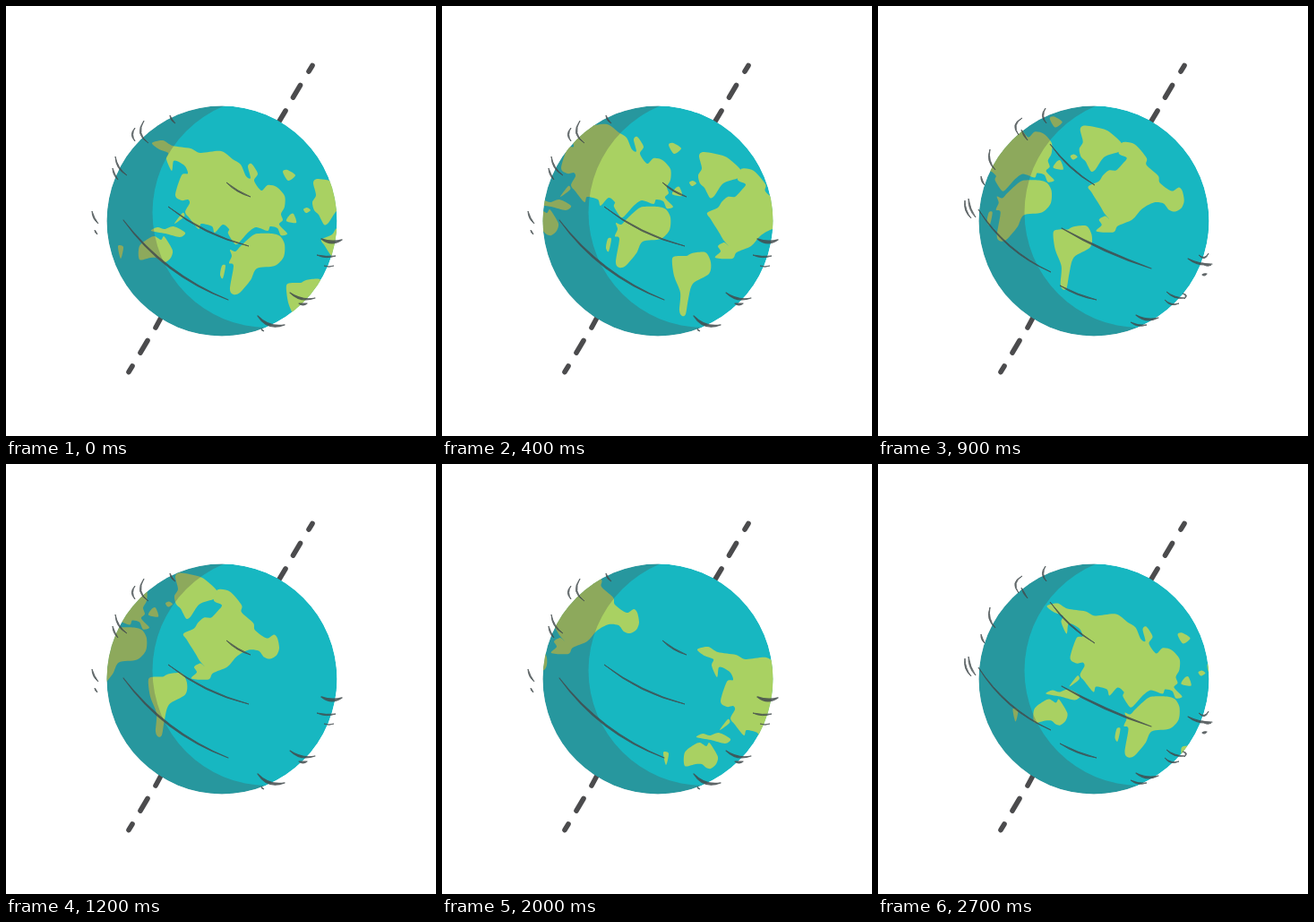
Write an HTML page that moves like this. It is 480x480 px and loops after 2800 ms.

```html
<!DOCTYPE html>
<html lang="en">
<head>
<meta charset="utf-8">
<title>Spinning globe</title>
<style>
html, body { margin: 0; width: 100%; height: 100%; overflow: hidden; background: #fff; }
svg { display: block; width: 100vw; height: 100vh; }
.lines { fill: #434b4d; stroke: #434b4d; stroke-linejoin: round; opacity: .85; }
</style>
</head>
<body>
<svg viewBox="0 0 480 480">
  <defs>
    <clipPath id="disc"><circle id="ball" cx="241" cy="240" r="128.5"/></clipPath>
    <clipPath id="rim"><use href="#ball"/></clipPath>
    <g id="land" fill="#a9d162"></g>
  </defs>
  <path d="M342 66.5L338 73M328.5 88.5L320.5 102M312 117L303 132M174 346L167 359M158 373.5L150 387M141 402L137 408.5"
    stroke="#4b4b4d" stroke-width="5.6" stroke-linecap="round"/>
  <g clip-path="url(#disc)">
    <use href="#ball" fill="#17b7c1"/>
    <g id="map">
      <use href="#land"/>
      <use href="#land" x="361" y="154"/>
    </g>
    <path d="M100 100H420V380H100ZM163.500 230.500a128.500 128.500 0 0 0 257 0a128.500 128.500 0 0 0-257 0Z"
      fill="#4d4d4d" fill-opacity=".3" fill-rule="evenodd"/>
  </g>
  <g class="lines"></g>
  <g class="lines"></g>
</svg>
<script>
const LOOP = 2800, STEP = 100;

const eurasia = `163,153 175,150 186,156 206,159 217,164 240,162 253,171 262,177 268,190 273,192
  270,179 274,176 281,187 277,195 285,206 292,200 302,202 311,212 311,224 307,232 309,239 305,244
  314,254 307,256 303,248 295,246 292,251 279,247 269,254 262,262 256,266 248,254 249,249 242,244
  233,253 230,246 218,243 215,249 205,237 200,230 205,220 203,216 196,217 189,211 196,189 203,187
  200,179 193,174 187,173 185,184 179,171 181,164 171,160`;

const africa = `250,272 256,274 262,268 274,257 281,254 297,254 306,257 311,266 310,280 300,290
  280,293 273,306 261,320 254,322 250,316 254,290 249,287 252,279`;

const australia = `149,268 160,259 166,257 173,261 176,257 180,262 186,273 184,281 178,286 173,285
  168,281 161,281 149,283`;

const greenland = `343,197 349,193 372,198 387,210 391,217 387,222 370,228 360,242 355,244 349,233
  344,228 342,219 346,211`;

const northAmerica = `352,261 364,255 368,249 375,243 383,243 390,236 395,229 386,224 390,212
  404,214 417,229 417,237 430,249 432,257 445,266 453,262 457,266 459,277 456,285 449,289 442,287
  436,280 425,279 412,286 401,298 385,305 380,312 361,311 367,304 364,298 371,294 376,298 370,291
  366,284 356,268`;

const southAmerica = `313,312 320,309 329,309 335,306 350,305 356,316 354,329 336,340 331,357
  328,374 324,376 321,370 322,350 315,331`;

const islands = `125,268 131,269 128,282/162,251 169,247 177,249 187,246 200,253 194,258 178,254/
  188,243 197,231 199,235/241,290 245,290 242,304 239,300/309,185 314,183 323,189 315,195/
  313,240 317,233 321,232 324,242/332,227 336,225 340,228 335,231`;

// Each stroke: start, end, bend and, if not the usual, thickness
const even = `246 197 273 213 1.6; 181 224 271 268 5.3; 131 239 248 328 10.5 2.6;
  352 260 375 261 3 4; 347 278 368 279 1.5; 355 290 366 290 1 1; 317 320 345 326 3.8 2.6;
  327 332 336 332 1 3; 281 346 311 356 5.3 3.6; 285 360 288 363 .5; 154 128 159 153 6.4;
  144 136 144 151 3; 183 122 189 131 1; 122 168 135 189 3; 119 181 125 194 1; 96 229 103 243 1.3;
  99 250 102 255 .3`;

const odd = `192 154 242 200 3.4; 205 248 305 293 2.6 2.6; 112 227 193 297 8; 203 312 244 328 1.8;
  346 282 373 288 2.5 2.6; 358 278 369 276 4; 362 287 372 289 1.5; 362 300 367 299 .3 3;
  322 319 342 326 2.3; 342 327 340 321 2.8; 320 328 336 332 2.9; 288 345 313 348 3.3 3;
  282 353 300 356 2; 187 114 188 131 3.4; 161 125 157 144 5.6; 160 138 167 150 .5;
  125 160 131 183 3.5; 115 190 119 200 .8; 97 217 104 237 2.4; 101 215 109 236 1.9`;

// Time step, x and y of the map
const path = [[0, 0, 0], [4, -56, -30], [7, -92, -50], [12, -154, -71.5],
  [16, -192.5, -83.5], [20, -239, -100], [27, -335.5, -148.5]];

// Closed curve through the points
function blob(text) {
  const p = text.trim().split(/\s+/).map(s => s.split(",").map(Number));
  const n = p.length, k = 0.14;
  let d = "M" + p[0];
  for (let i = 0; i < n; i++) {
    const a = p[(i + n - 1) % n], b = p[i], c = p[(i + 1) % n], e = p[(i + 2) % n];
    const h1 = b.map((v, j) => v + (c[j] - a[j]) * k);
    const h2 = c.map((v, j) => v - (e[j] - b[j]) * k);
    d += `C${h1} ${h2} ${c}`;
  }
  return `<path d="${d}Z"/>`;
}

// Brush stroke, thickest in the middle
function brush(text) {
  const [x0, y0, x1, y1, bend, w = 2] = text.trim().split(/\s+/).map(Number);
  const len = Math.hypot(x1 - x0, y1 - y0);
  const nx = (y0 - y1) / len, ny = (x1 - x0) / len;
  const mid = s => `${(x0 + x1) / 2 + nx * s} ${(y0 + y1) / 2 + ny * s}`;
  const r = w * 0.65;
  return `<path d="M${x0} ${y0}Q${mid(2 * bend + r)} ${x1} ${y1}Q${mid(2 * bend - r)} ${x0} ${y0}Z"
    stroke-width="${0.5 + w * 0.22}"/>`;
}

function slope(i, j) {
  const a = path[Math.max(i - 1, 0)], b = path[Math.min(i + 1, path.length - 1)];
  return (b[j] - a[j]) / (b[0] - a[0]);
}

// Smooth position between the points of the path
function place(s, j) {
  let i = 0;
  while (i < path.length - 2 && s >= path[i + 1][0]) i++;
  const a = path[i], b = path[i + 1], h = b[0] - a[0], u = (s - a[0]) / h;
  const u2 = u * u, u3 = u2 * u;
  return (2 * u3 - 3 * u2 + 1) * a[j] + (u3 - 2 * u2 + u) * h * slope(i, j)
    + (3 * u2 - 2 * u3) * b[j] + (u3 - u2) * h * slope(i + 1, j);
}

document.getElementById("land").innerHTML =
  [eurasia, africa, australia, greenland, northAmerica, southAmerica, ...islands.split("/")].map(blob).join("");

const map = document.getElementById("map");
const lines = [...document.querySelectorAll(".lines")];
[even, odd].forEach((set, i) => {
  lines[i].innerHTML = set.split(";").map(brush).join("");
});

function draw(ms) {
  const s = Math.floor((ms % LOOP) / STEP);
  map.setAttribute("transform", `translate(${place(s, 1)} ${place(s, 2)})`);
  lines.forEach((g, i) => g.setAttribute("visibility", s % 2 === i ? "visible" : "hidden"));
}

const start = performance.now();
function tick() {
  draw(performance.now() - start);
  requestAnimationFrame(tick);
}
draw(0);
requestAnimationFrame(tick);
</script>
</body>
</html>
```
